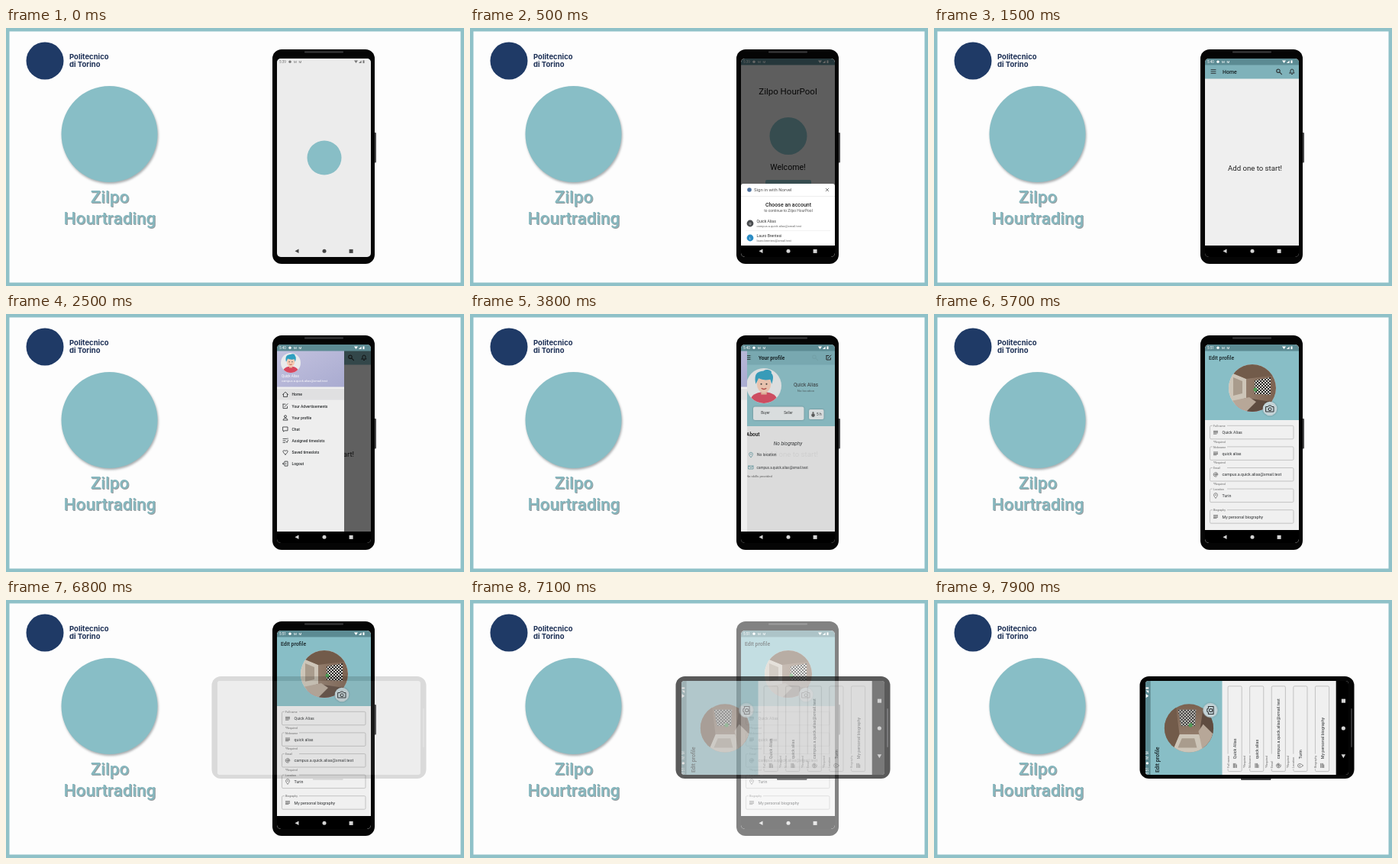
An HTML page that plays this animation: 600x338 px, repeating every 8000 ms.

```html
<!DOCTYPE html>
<html lang="en">
<head>
<meta charset="utf-8">
<title>App walkthrough</title>
<style>
html, body { margin: 0; width: 100%; height: 100%; overflow: hidden; background: #fdfdfd; }
svg { display: block; width: 100vw; height: 100vh; }
text { font-family: Roboto, "Open Sans", sans-serif; white-space: pre; }
.uni { font-family: Inter, "Open Sans", sans-serif; }
.soft { filter: drop-shadow(1px 2px 1.5px rgba(60, 70, 75, .45)); }
.word { filter: drop-shadow(1px 1px .6px rgba(70, 80, 85, .55)); }
.card { filter: drop-shadow(0 .6px .8px rgba(0, 0, 0, .3)); }
</style>
</head>
<body>
<svg id="stage" viewBox="0 0 600 338" preserveAspectRatio="none"></svg>
<script>
const LOOP = 8000;
const TEAL = '#88bec6', BAR = '#7fb2ba', STATUS = '#5c8b93', INK = '#2c2f31';
const APP = ['Zilpo', 'Hourtrading'], BANK = 'Zilpo HourPool';
const USER = 'Quick Alias', MAIL = 'campus.a.quick.alias@xmail.test';

// drawing helpers
const rect = (x, y, w, h, fill, more = '') =>
  `<rect x="${x}" y="${y}" width="${w}" height="${h}" fill="${fill}" ${more}/>`;
const disc = (x, y, r, fill, more = '') =>
  `<circle cx="${x}" cy="${y}" r="${r}" fill="${fill}" ${more}/>`;
const text = (x, y, size, str, fill = INK, more = '') =>
  `<text x="${x}" y="${y}" font-size="${size}" fill="${fill}" ${more}>${str}</text>`;
const mid = (x, y, size, str, fill, more = '') =>
  text(x, y, size, str, fill, `text-anchor="middle" ${more}`);
const group = (id, body, more = '') => `<g id="${id}" ${more}>${body}</g>`;
const line = (d, x = 0, y = 0, w = .8, color = INK) =>
  `<path d="${d}" transform="translate(${x} ${y})" fill="none" stroke="${color}" stroke-width="${w}" stroke-linecap="round" stroke-linejoin="round"/>`;

const icon = {
  home: 'M-3.5 0L0-3.3L3.5 0M-2.5-.6V3H2.5V-.6',
  edit: 'M-3-2.5H0M-3-2.5V3H2.5V.5M-1 1L3-3',
  user: 'M-1.5-1.5A1.5 1.5 0 1 0 1.5-1.5A1.5 1.5 0 1 0-1.5-1.5M-3 3Q-2.6.8 0 .8T3 3Z',
  chat: 'M-3-2.8H3V2H-1L-2.5 3.3V2H-3Z',
  list: 'M-3-2.5H1.5M-3 0H0M-3 2.5H-.5M1 1.2L2 2.5L3.5-.5M3-3V-2',
  heart: 'M0 3C-5-.2-3-4 0-1.5C3-4 5-.2 0 3Z',
  exit: 'M-1-1.5V-3H3V3H-1V1.5M1 0H-3.5M-2.2-1.2L-3.5 0L-2.2 1.2',
  search: 'M-3.2-.8A2.2 2.2 0 1 0 1.2-.8A2.2 2.2 0 1 0-3.2-.8M.7.9L3.5 3.6',
  bell: 'M-3 2H3L2 .5V-1A2 2 0 0 0-2-1V.5ZM-.6 3.4H.6',
  camera: 'M-5-2.5H-2.5L-1.5-4H1.5L2.5-2.5H5V4H-5ZM-2 .7A2 2 0 1 0 2 .7A2 2 0 1 0-2 .7',
  notes: 'M-2.6-1.8H2.6M-2.6-.5H2.6M-2.6.8H2.6M-2.6 2.1H1',
  at: 'M-1.2 0A1.2 1.2 0 1 0 1.2 0A1.2 1.2 0 1 0-1.2 0M1.2-1V.6Q2.6 1.6 2.8 0A2.8 2.8 0 1 0 1.2 2.6',
  pin: 'M0 3.3C-4-.6-2.4-3.2 0-3.2S4-.6 0 3.3M-.7-.8H.7',
  mail: 'M-3-2H3V2H-3ZM-3-2L0 .5L3-2'
};

const status = (time, bg, ink = '#fff') =>
  (bg ? rect(355, 40, 123, 8.5, bg) : '') +
  text(358, 46, 4.6, time, ink) + disc(372, 44.3, 1.7, ink) +
  text(377, 46, 4.4, 'M', ink) + text(383.5, 46, 4.4, 'M', ink) +
  `<path d="M456 42.6H461L458.5 46ZM462 46L465.6 42.4V46Z" fill="${ink}"/>` +
  rect(467.5, 42.4, 2, 3.7, ink);

const nav = (bg, ink, top = 285) =>
  rect(355, top, 123, 300 - top, bg) +
  `<path d="M378.5 292.3L383.5 289.6V295Z" fill="${ink}"/>` +
  disc(417, 292.3, 2.5, ink) + rect(449.6, 289.9, 5, 5, ink);

const avatar = (x, y, r) => `<g transform="translate(${x} ${y}) scale(${r})">` +
  disc(0, 0, 1, '#e9ebec') +
  '<path d="M-.72 .69A1 1 0 0 0 .72 .69C.55 .25-.55 .25-.72 .69Z" fill="#d8475e"/>' +
  rect(-.16, .2, .32, .3, '#eab79d') +
  '<ellipse cy="-.1" rx=".4" ry=".5" fill="#f6cbb4"/>' +
  '<path d="M-.46-.1C-.62-.85-.2-.8-.02-.85C.2-1 .5-.85.42-.72C.6-.55.5-.3.45-.1L.36-.36Q0-.28-.3-.42Z" fill="#2f9fc0"/>' +
  disc(-.15, -.1, .045, '#333') + disc(.15, -.1, .045, '#333') +
  '<path d="M-.14 .14Q0 .25.14 .14" stroke="#b5443f" stroke-width=".06" fill="none"/></g>';

const photo = `<g transform="translate(417 97)"><g clip-path="url(#round)">` +
  rect(-32, -32, 64, 64, 'url(#room)') +
  '<path d="M-32-22L-8-12V14L-32 20Z" fill="#cdc5b8"/>' +
  '<path d="M-25-14L-13-9V7L-25 10Z" fill="#a99c8d"/>' +
  '<path d="M-32-32H32V-17L-8-12L-32-22Z" fill="#725b4a"/>' +
  '<path d="M-32 20L-8 13L32 19V32H-32Z" fill="#5f4c40"/>' +
  '<path d="M-28 17L-4 12L5 18L-8 31H-28Z" fill="#b7a798"/>' +
  '<path d="M3-10L24-14V9L3 8Z" fill="url(#check)"/>' + disc(4, 2, 2.5, '#4e9a55') + '</g></g>';

const tick = (str, from, gap) => [...str].map((c, i) =>
  `<tspan class="key" data-at="${from + i * gap}">${c}</tspan>`).join('');

// edit form; the live one types its last two values
function editScreen(live) {
  const rows = [
    ['Full name', 'notes', USER], ['Nickname', 'notes', 'quick alias'], ['Email', 'at', MAIL],
    ['Location', 'pin', live ? tick('Turin', 4800, 30) : 'Turin'],
    ['Biography', 'notes', live ? tick('My personal biography', 5000, 18) : 'My personal biography']
  ];
  const fields = rows.map(([label, ic, value], i) => {
    const y = 146.3 + i * 27.6;
    return rect(361.5, y, 109.5, 17.5, 'none', 'rx="1.5" stroke="#a6a6a6" stroke-width=".6"') +
      rect(365, y - 1, 19, 2, '#f0f0f0') +
      text(366, y + 1.6, 3.6, label, '#666') +
      line(icon[ic], 369, y + 8.8, .7, '#555') +
      text(377.5, y + 10.8, 5.3, value) +
      (i < 3 ? text(366, y + 22.2, 3.6, '*Required', '#666') : '');
  }).join('');
  return rect(355, 40, 123, 260, '#f0f0f0') + rect(355, 48, 123, 91, TEAL) +
    status('5:51', STATUS) +
    text(360, 59.5, 6.9, 'Edit profile', '#182326', 'font-weight="500"') +
    (live ? avatar(417, 97, 31) + group('shot', photo) : photo) +
    disc(440, 124, 9.3, '#c3d3d7', 'class="card"') + line(icon.camera, 440, 124, 1) +
    fields + nav('#000', '#d4d4d4', 283);
}

const splash = rect(355, 40, 123, 260, '#ececec') + status('5:39', '', '#777') +
  disc(417, 170, 22.5, TEAL) + nav('#ececec', '#444', 286);

const account = (y, color, name, mail) =>
  disc(367, y, 4.4, color) + mid(367, y + 1.6, 4.4, name[0], '#fff') +
  text(375.5, y - .6, 5.1, name, '#333') + text(375.5, y + 4.8, 4, mail, '#666');

const login = rect(355, 40, 123, 260, '#ececec') + status('5:39', STATUS) +
  mid(416.5, 87, 11.5, BANK, '#111') + disc(417, 141.5, 24.5, TEAL) +
  mid(416.5, 185.5, 10.6, 'Welcome!', '#111') +
  rect(387, 199, 60, 15, TEAL, 'rx="2"') + mid(417, 208.5, 5.6, 'SIGN IN', '#fff') +
  group('shade', rect(355, 40, 123, 260, '#000')) +
  group('sheet', '<path d="M355 290V207Q355 204 358 204H475Q478 204 478 207V290Z" fill="#fff"/>' +
    disc(366, 212, 2.8, '#4c6f9c') + text(372, 214.1, 6, 'Sign in with Norvel', '#555') +
    line('M-1.8-1.8L1.8 1.8M-1.8 1.8L1.8-1.8', 468, 212, .7, '#444') +
    rect(355, 220.5, 123, .5, '#ddd') +
    mid(417, 234.3, 7, 'Choose an account', '#222', 'font-weight="500"') +
    mid(417, 241, 4.9, 'to continue to ' + BANK, '#555') +
    account(256, '#4a4d50', USER, MAIL) + rect(361, 265, 111, .4, '#ddd') +
    account(275, '#2b8cc4', 'Lauro Brentesi', 'lauro.brentesi@xmail.test')) +
  nav('#000', '#d4d4d4');

const home = rect(355, 40, 123, 260, '#efefef') + rect(355, 48, 123, 18.5, BAR) +
  line('M-3-2.4H3M-3 0H3M-3 2.4H3', 366, 57, .9) + text(378, 59.5, 7, 'Home', '#182326', 'font-weight="500"') +
  line(icon.search, 452, 57, 1.1) + line(icon.bell, 469, 57, 1) +
  text(456, 187, 9.6, 'Add one to start!', '#222', 'text-anchor="end"');

const profile = rect(355, 40, 123, 260, '#e8e8e8') + rect(355, 66, 123, 81, TEAL) +
  rect(355, 48, 123, 18.5, BAR) + line('M-3-2.4H3M-3 0H3M-3 2.4H3', 364, 57, .9) +
  text(378, 59.6, 6.6, 'Your profile', '#182326', 'font-weight="700"') + line(icon.edit, 470, 57, 1) +
  avatar(385, 94, 23) + mid(440, 94.5, 6.5, USER) + mid(440, 101.5, 4.4, 'No location', '#4a5b5f') +
  rect(371, 121.5, 66.5, 17.5, '#e6eaeb', 'rx="2.5" class="card"') +
  mid(387, 131, 4.6, 'Buyer') + mid(417, 131, 4.6, 'Seller') +
  rect(444, 125, 19.5, 13, '#e3e8e9', 'rx="2" class="card"') +
  disc(449.5, 132.6, 2.3, '#555') + disc(449.5, 129.3, 1.1, '#555') + text(454, 133.3, 4.8, '5 h') +
  text(362, 160.3, 6.5, 'About', '#222', 'font-weight="700"') +
  mid(416.5, 172.3, 6.5, 'No biography', INK, 'font-style="italic"') +
  line(icon.pin, 368, 184.5, .9, '#689ca4') + text(376, 186.3, 5, 'No location') +
  line(icon.mail, 368, 201, .9, '#689ca4') + text(375.5, 202.7, 4.6, MAIL) +
  text(362, 213.5, 4.3, 'No skills provided', '#555');

const menu = [['home', 'Home'], ['edit', 'Your Advertisements'], ['user', 'Your profile'], ['chat', 'Chat'],
  ['list', 'Assigned timeslots'], ['heart', 'Saved timeslots'], ['exit', 'Logout']];
const drawer = rect(355, 48, 88, 238, '#eeeeee') + rect(355, 48, 88, 47.5, 'url(#lilac)') +
  avatar(373, 64, 13) + text(361, 83.3, 4.6, USER, '#fff') + text(361, 89.3, 4.1, MAIL, '#fff') +
  rect(355, 98, 88, 14.5, '#e0e0e1') +
  menu.map(([ic, name], i) => line(icon[ic], 366, 105.5 + i * 15.1) +
    text(374.5, 107.4 + i * 15.1, 5, name, INK, 'font-weight="500"')).join('');

const inside = home + group('profile', profile) + group('scrim', rect(355, 48, 123, 238, '#000')) +
  group('drawer', drawer) + status('5:40', STATUS) + nav('#000', '#d4d4d4');

const frame = rect(482, 137, 3, 39.5, '#4a4a4c', 'rx="1"') +
  rect(349, 28, 134, 281, '#050505', 'rx="12"') + rect(391, 30.6, 51, 1.8, '#3b3b3d', 'rx=".9"');

document.getElementById('stage').innerHTML = `<defs>
  <clipPath id="tall"><rect x="355" y="40" width="123" height="260" rx="5"/></clipPath>
  <clipPath id="wide"><rect x="277" y="106" width="266" height="123" rx="4"/></clipPath>
  <clipPath id="round"><circle r="31"/></clipPath>
  <linearGradient id="lilac" x2="1" y2="1"><stop stop-color="#c3c2df"/><stop offset="1" stop-color="#a9abd0"/></linearGradient>
  <linearGradient id="room"><stop stop-color="#a08c7c"/><stop offset="1" stop-color="#7b614f"/></linearGradient>
  <pattern id="check" width="4" height="4" patternUnits="userSpaceOnUse">
    <rect width="4" height="4" fill="#d9d6d0"/><path d="M0 0H2V4H4V2H0Z" fill="#262626"/></pattern>
  </defs>` +
  rect(0, 0, 600, 338, '#8fc1c8') + rect(4.5, 4.5, 591, 329, '#fdfdfd') +
  disc(51, 43, 24.5, '#1f3a66') +
  text(83, 40.6, 9.5, 'Politecnico', '#1c2f55', 'class="uni" font-weight="700"') +
  text(83, 51, 9.5, 'di Torino', '#1c2f55', 'class="uni" font-weight="700"') +
  disc(135.5, 139, 63, TEAL, 'class="soft"') +
  APP.map((w, i) => mid(136, 229 + i * 27.5, 22.5, w, '#86b7be', 'class="word" font-weight="500"')).join('') +
  group('upright', frame + `<g clip-path="url(#tall)">` + inside +
    group('login', login) + group('splash', splash) + group('edit', editScreen(true)) + '</g>') +
  group('sideways', `<g transform="translate(410 167) rotate(90) translate(-416 -168.5)">${frame}</g>` +
    `<g clip-path="url(#wide)"><g transform="matrix(0 -1.02 1.036 0 233.5 593.3)">${editScreen(false)}</g>` +
    group('veil', rect(277, 106, 266, 123, '#8c8c8c')) + '</g>');

// rows: [ms, value, easing towards the next row]; without easing the value holds
function anim(el, prop, rows) {
  const all = [...rows, [LOOP, rows[rows.length - 1][1]]];
  const frames = all.map(([t, v, easing = 'steps(1, end)']) => ({ offset: t / LOOP, [prop]: v, easing }));
  el.animate(frames, { duration: LOOP, iterations: Infinity });
}
const y = n => `translate(0px, ${n}px)`, x = n => `translate(${n}px, 0px)`;
const table = [
  ['splash', 'opacity', [[0, 1], [200, 0]]],
  ['login', 'opacity', [[0, 1], [1200, 1, 'linear'], [1350, 0]]],
  ['shade', 'opacity', [[0, 0], [350, 0, 'linear'], [450, .6], [1000, .6, 'linear'], [1150, 0]]],
  ['sheet', 'transform', [[0, y(90)], [350, y(90), 'ease-out'], [480, y(0)], [1000, y(0), 'ease-in'], [1150, y(90)]]],
  ['drawer', 'transform', [[0, x(-90)], [2200, x(-90), 'ease-out'], [2400, x(0)], [3600, x(0), 'linear'], [3822, x(-88)]]],
  ['scrim', 'opacity', [[0, 0], [2200, 0, 'linear'], [2400, .6], [3600, .6, 'linear'], [3822, 0]]],
  ['profile', 'opacity', [[0, 0], [3600, 0, 'linear'], [3815, 1]]],
  ['edit', 'opacity', [[0, 0], [4600, 0, 'linear'], [4700, 1]]],
  ['shot', 'opacity', [[0, 0], [5450, 0, 'linear'], [5600, 1]]],
  ['upright', 'opacity', [[0, 1], [6900, 1, 'linear'], [7300, 0]]],
  ['sideways', 'opacity', [[0, 0], [6720, 0, 'linear'], [7300, 1]]],
  ['veil', 'opacity', [[0, 1], [6850, 1, 'linear'], [7250, 0]]]
];
table.forEach(([id, prop, rows]) => anim(document.getElementById(id), prop, rows));
document.querySelectorAll('.key').forEach(k => anim(k, 'fillOpacity', [[0, 0], [+k.dataset.at, 1]]));
</script>
</body>
</html>
```
